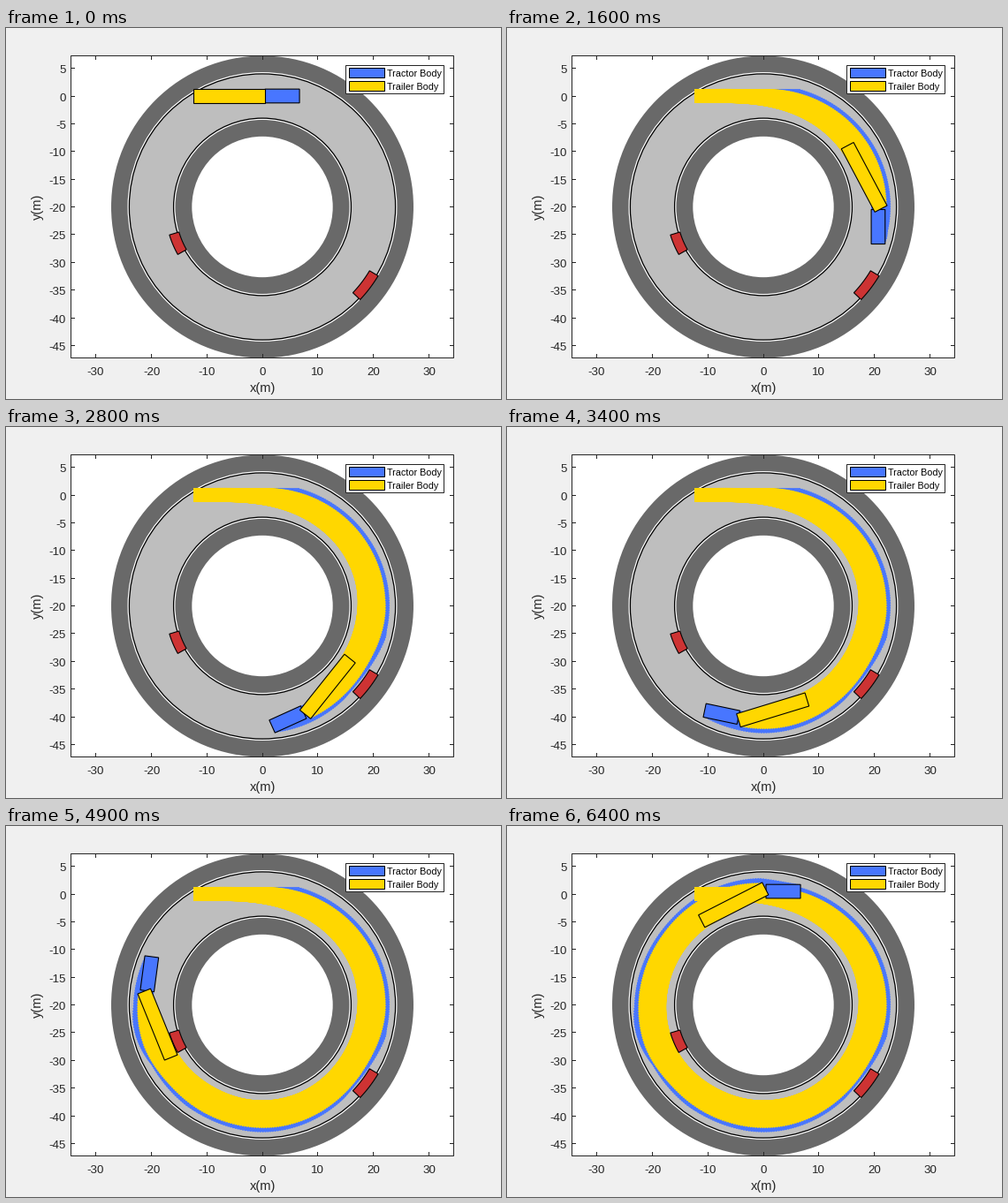
A matplotlib script for the animation above (6500 ms loop, 560 by 420 pixels).

```python
import numpy as np
import matplotlib.pyplot as plt
from matplotlib.animation import FuncAnimation
from matplotlib.collections import PolyCollection
from matplotlib.patches import Circle, Polygon, Rectangle

W, H, DPI = 560, 420, 80
PX = 72 / DPI                      # one pixel in points
SCALE, CX, CY = 6.275, 290, 202.5  # pixels per metre, ring centre on stage
LEFT, RIGHT, TOP, BOTTOM = 73.5, 506.5, 31.5, 373.5
FRAMES, INTERVAL = 65, 100
SUB, TRAIL = 10, 2                 # simulation steps per frame, steps per trail print

BLUE, GOLD, RED = "#4876FF", "#FFD700", "#CD3333"
ROAD, VERGE, INK = "#BEBEBE", "#696969", "#262626"

# Vehicle, in metres
HALF_W = 1.25
TRACTOR_BACK, TRACTOR_FRONT = 0.48, 6.7
HITCH = 0.6                        # hitch behind the tractor axle
NOSE, TRAILER_LEN = 1.08, 12.9     # trailer front ahead of the hitch
TRAILER_BASE = 9.2                 # hitch to trailer axle

# Turned angle in degrees and the driven radius there
TURN = [0, 85, 90, 122, 175, 200, 225, 253, 310, 342, 360]
RADIUS = [20, 20.68, 20.7, 20.2, 20.67, 20.6, 20.55, 21.1, 20.6, 20.65, 20.48]


def stage(p):
    """Metres relative to the ring centre -> stage pixels."""
    p = np.asarray(p, float)
    return np.stack([CX + SCALE * p[..., 0], CY - SCALE * p[..., 1]], -1)


def unit(a):
    return np.stack([np.cos(a), np.sin(a)], -1)


def radius(turn):
    k = np.clip(np.searchsorted(TURN, turn, side="right") - 1, 0, len(TURN) - 2)
    t0, r0 = np.array(TURN)[k], np.array(RADIUS)[k]
    t1, r1 = np.array(TURN)[k + 1], np.array(RADIUS)[k + 1]
    u = (turn - t0) / (t1 - t0)
    return r0 + (r1 - r0) * u * u * (3 - 2 * u)


def body(origin, heading, back, front):
    d = unit(heading)
    n = np.stack([-d[..., 1], d[..., 0]], -1)
    corners = [(back, HALF_W), (front, HALF_W), (front, -HALF_W), (back, -HALF_W)]
    return stage(np.stack([origin + a * d + b * n for a, b in corners], -2))


def drive():
    """Outlines of tractor and trailer for every simulation step."""
    turn = np.linspace(0, 360, (FRAMES - 1) * SUB + 1)
    angle = np.radians(90 - turn)
    r = radius(turn)
    axle = r[:, None] * unit(angle)
    drift = np.arctan(np.gradient(r, np.radians(turn)) / r)
    heading = angle - np.pi / 2 + drift
    hitch = axle - HITCH * unit(heading)
    tow = np.zeros(len(turn))
    for i in range(1, len(turn)):
        dx, dy = hitch[i] - hitch[i - 1]
        a = tow[i - 1]
        tow[i] = a + (dy * np.cos(a) - dx * np.sin(a)) / TRAILER_BASE
    return (body(axle, heading, TRACTOR_BACK, TRACTOR_FRONT),
            body(hitch, tow, NOSE - TRAILER_LEN, NOSE))


fig = plt.figure(figsize=(W / DPI, H / DPI), dpi=DPI, facecolor="#F0F0F0")
ax = fig.add_axes([0, 0, 1, 1])
ax.set_xlim(0, W)
ax.set_ylim(H, 0)
ax.axis("off")


def disc(r, fill, edge="none"):
    ax.add_patch(Circle((CX, CY), r * SCALE, fc=fill, ec=edge, lw=1.3 * PX, zorder=1))


def box(x0, y0, x1, y1, fill, edge, z):
    ax.add_patch(Rectangle((x0, y0), x1 - x0, y1 - y0, fc=fill, ec=edge,
                           lw=PX, zorder=z, joinstyle="miter", snap=False))


def label(x, y, s, px, color=INK, **kw):
    kw = {"ha": "center", "va": "baseline", **kw}
    ax.text(x, y, s, fontsize=px * PX, family="Liberation Sans", color=color,
            zorder=12, **kw)


def obstacle(r0, r1, a0, a1):
    a = np.radians(np.linspace(a0, a1, 16))
    ring = np.concatenate([r0 * unit(a), r1 * unit(a[::-1])])
    ax.add_patch(Polygon(stage(ring), fc=RED, ec="black", lw=1.1 * PX, zorder=5,
                         joinstyle="miter"))


def tick(xs, ys):
    ax.plot(xs, ys, color=INK, lw=PX, zorder=9, solid_capstyle="butt", snap=False)


# Ring road
box(LEFT, TOP, RIGHT, BOTTOM, "white", "none", 0)
disc(27.25, VERGE)
disc(24.3, "white")
disc(24, ROAD, "black")
disc(16, "white", "black")
disc(15.7, VERGE)
disc(12.7, "white")
obstacle(15.7, 17.5, 196.8, 209.4)
obstacle(22.5, 24.3, -30.8, -43.5)

# Axes
box(LEFT, TOP, RIGHT, BOTTOM, "none", INK, 9)
for v in range(-30, 31, 10):
    x = np.floor(CX + v * SCALE) + 0.5
    tick([x, x], [BOTTOM, BOTTOM - 4.5])
    tick([x, x], [TOP, TOP + 4.5])
    label(x, 393, str(v), 13.33)
for v in range(-45, 6, 5):
    y = np.floor(CY - (v + 20) * SCALE) + 0.5
    tick([LEFT, LEFT + 4.5], [y, y])
    tick([RIGHT, RIGHT - 4.5], [y, y])
    label(68, y + 5.5, str(v), 13.33, ha="right")
label(290.5, 412, "x(m)", 14.67)
label(35.5, 202.5, "y(m)", 14.67, rotation=90, va="center")

# Legend
box(384.5, 42.5, 495.5, 74.5, "white", INK, 10)
for y, fill, name in [(45.5, BLUE, "Tractor Body"), (60.5, GOLD, "Trailer Body")]:
    box(388.5, y, 428.5, y + 11, fill, "black", 11)
    label(431, y + 9.5, name, 10.8, "black", ha="left")

# Moving parts
tractors, trailers = drive()
prints, bodies = [], []
for z, fill in [(2, BLUE), (3, GOLD)]:
    prints.append(ax.add_collection(
        PolyCollection([], facecolors=fill, edgecolors="none", zorder=z),
        autolim=False))
for z, fill, shape in [(6, BLUE, tractors), (7, GOLD, trailers)]:
    bodies.append(ax.add_patch(Polygon(shape[0], fc=fill, ec="black", lw=1.1 * PX,
                                       zorder=z, joinstyle="miter")))


def update(frame):
    now = frame * SUB
    for shape, trail, outline in zip((tractors, trailers), prints, bodies):
        trail.set_verts(shape[:now + 1:TRAIL])
        outline.set_xy(shape[now])
    return prints + bodies


anim = FuncAnimation(fig, update, frames=FRAMES, interval=INTERVAL,
                     init_func=lambda: update(0), repeat=True, repeat_delay=0,
                     blit=False)
plt.show()
```
